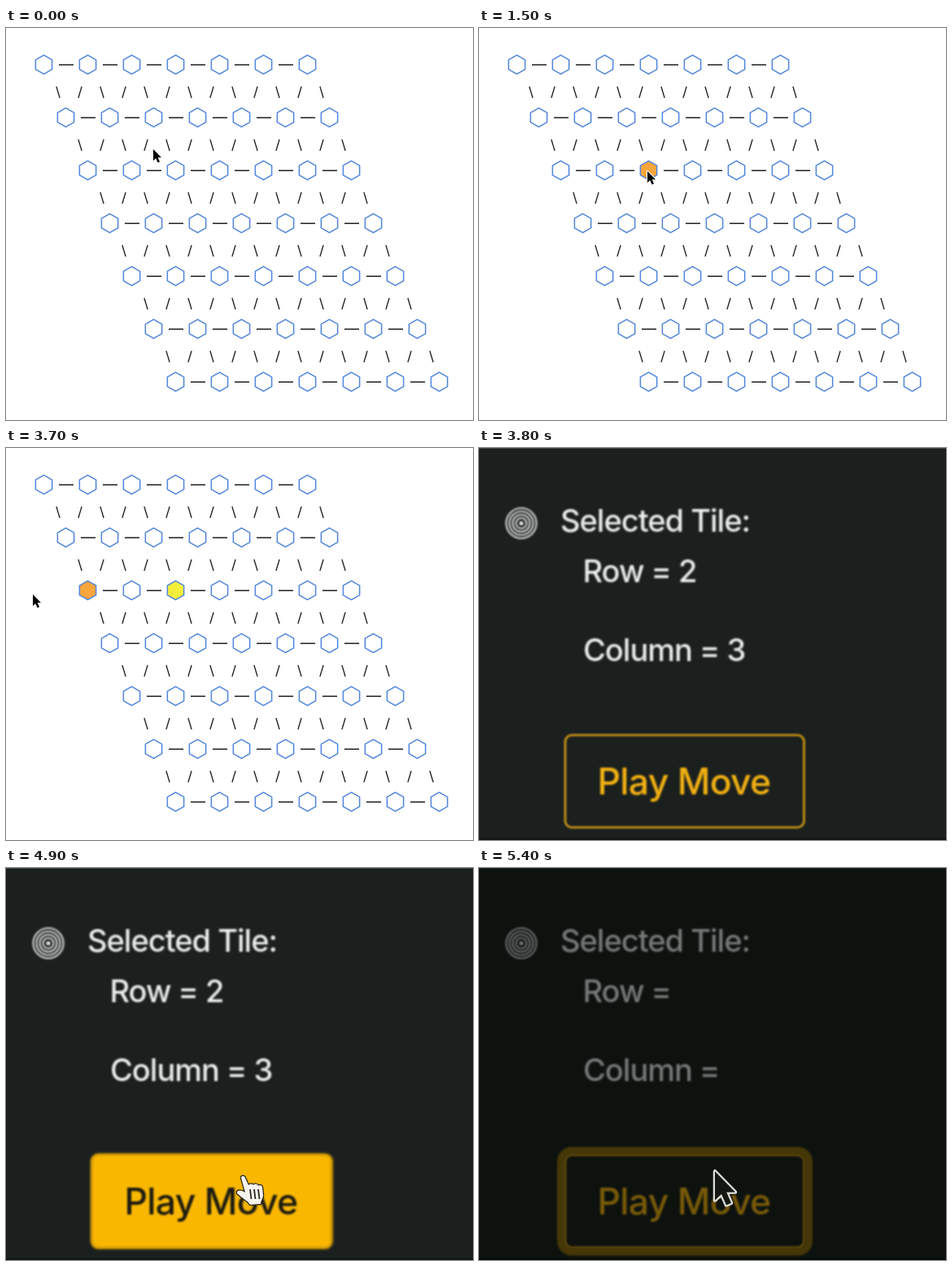
Animation, 574 px wide and 482 px high, one loop 5500 ms. Source, as an HTML page with a canvas:

```html
<!DOCTYPE html>
<html lang="en">
<head>
<meta charset="utf-8">
<title>Hex board move</title>
<style>
  html, body { margin: 0; width: 574px; height: 482px; overflow: hidden; background: #fff; }
  canvas { display: block; }
</style>
</head>
<body>
<canvas id="stage" width="574" height="482"></canvas>
<script>
const ctx = document.getElementById('stage').getContext('2d');
const W = 574, H = 482, LOOP = 5500, STEP = 100;
const SIZE = 7, HEX = 11.7;
const CUT = 3800, CLICK = 2300, PRESS = 4870, CLEAR = 5100, DIM = 5200;
const selected = { row: 2, col: 2 };

// Pointer keys: time, x, y
const boardPath = [[0, 181, 149], [100, 181, 149], [700, 207, 176], [3300, 207, 176],
  [3500, 160, 178], [3600, 102, 179], [3700, 33, 180]];
const panelPath = [[4000, 345, 325], [4100, 305, 362], [4200, 291, 378], [4600, 291, 378],
  [4900, 289, 379], [5100, 289, 379], [5200, 290, 373]];

const clamp = v => Math.max(0, Math.min(1, v));
const ramp = (t, start, length) => clamp((t - start) / length);

function along(path, t) {
  let i = 0;
  while (i < path.length - 2 && t > path[i + 1][0]) i++;
  const [t0, x0, y0] = path[i], [t1, x1, y1] = path[i + 1];
  const k = ramp(t, t0, t1 - t0);
  return [x0 + (x1 - x0) * k, y0 + (y1 - y0) * k];
}

const tileAt = (row, col) => [46.5 + 27 * row + 54 * col, 45 + 65 * row];

function line(x0, y0, x1, y1) {
  ctx.beginPath();
  ctx.moveTo(x0, y0);
  ctx.lineTo(x1, y1);
  ctx.stroke();
}

function hexagon(x, y, fill) {
  ctx.beginPath();
  for (let i = 0; i < 6; i++) {
    const a = Math.PI * (i / 3 - 0.5);
    ctx.lineTo(x + HEX * Math.cos(a), y + HEX * Math.sin(a));
  }
  ctx.closePath();
  if (fill) {
    ctx.fillStyle = fill;
    ctx.fill();
  }
  ctx.strokeStyle = '#4f84dc';
  ctx.lineWidth = 1.5;
  ctx.stroke();
}

function arrow(x, y, scale, fill, edge, width) {
  ctx.save();
  ctx.translate(x, y);
  ctx.scale(scale, scale);
  ctx.beginPath();
  for (const [px, py] of [[0, 0], [0, 14.2], [3.2, 11.2], [5.6, 16.6], [8, 15.6],
    [5.7, 10.3], [10, 10.2]]) ctx.lineTo(px, py);
  ctx.closePath();
  ctx.lineJoin = 'round';
  ctx.lineWidth = width;
  ctx.strokeStyle = edge;
  ctx.fillStyle = fill;
  ctx.stroke();
  ctx.fill();
  ctx.restore();
}

function hand(x, y) {
  ctx.save();
  ctx.translate(x, y);
  const shape = new Path2D('M0 2C0-1 4-1 5 2L9 11C11 9 14 9 15 11C17 9 20 9 21 12' +
    'C23 10 26 11 26 14L27 23C27 28 24 30 24 34L11 35C8 30 1 27-5 21C-6 17-1 16 5 20Z');
  ctx.filter = 'blur(0.7px)';
  ctx.lineJoin = 'round';
  ctx.lineWidth = 2.5;
  ctx.strokeStyle = '#25231c';
  ctx.stroke(shape);
  ctx.fillStyle = '#f6f4ee';
  ctx.fill(shape);
  ctx.lineWidth = 1.8;
  for (const dx of [0, 5, 10]) line(11 + dx, 16, 12.5 + dx, 28);
  ctx.restore();
}

function drawBoard(t) {
  ctx.fillStyle = '#fff';
  ctx.fillRect(0, 0, W, H);
  // The highlight trails the pointer by one step.
  const [hx, hy] = along(boardPath, t - STEP);
  for (let row = 0; row < SIZE; row++) {
    for (let col = 0; col < SIZE; col++) {
      const [x, y] = tileAt(row, col);
      ctx.strokeStyle = '#1c1c1c';
      ctx.lineWidth = 1.5;
      if (col < SIZE - 1) line(x + 18.5, y + 0.3, x + 36.5, y + 0.3);
      if (row < SIZE - 1) {
        ctx.lineWidth = 1.3;
        line(x + 15.4, y + 27, x + 19.6, y + 41);
        if (col > 0) line(x - 7.4, y + 27, x - 11.6, y + 41);
      }
      const picked = t >= CLICK && row === selected.row && col === selected.col;
      const hovered = Math.hypot(hx - x, hy - y) < HEX;
      hexagon(x, y, picked ? '#f5ef3c' : hovered ? '#fba63c' : null);
    }
  }
  arrow(...along(boardPath, t), 1, '#000', '#fff', 2);
}

function label(text, x, y, size, spacing, color) {
  ctx.font = `500 ${size}px Inter, sans-serif`;
  ctx.letterSpacing = `${spacing}px`;
  ctx.fillStyle = color;
  ctx.fillText(text, x, y);
}

function drawButton(t) {
  const hover = ramp(t, 4000, 150) * (1 - ramp(t, DIM, 150));
  const focus = ramp(t, PRESS, 150);
  if (focus) {
    const spread = 9 * focus;
    ctx.fillStyle = '#8c6a0e';
    ctx.beginPath();
    ctx.roundRect(105 - spread, 352 - spread, 296 + 2 * spread, 115.5 + 2 * spread, 9 + spread);
    ctx.roundRect(105, 352, 296, 115.5, 9);
    ctx.fill('evenodd');
  }
  ctx.beginPath();
  ctx.roundRect(106, 353, 293.5, 113.5, 8);
  ctx.fillStyle = `rgba(249, 183, 0, ${hover})`;
  ctx.fill();
  ctx.strokeStyle = hover > 0.5 ? '#f5b404' : '#d39a13';
  ctx.lineWidth = 2.6;
  ctx.stroke();
  const mix = (a, b) => Math.round(a + (b - a) * hover);
  label('Play Move', 145.5, 426, 44.5, -0.7, `rgb(${mix(242, 27)}, ${mix(177, 26)}, ${mix(18, 18)})`);
}

function drawPanel(t) {
  ctx.fillStyle = '#1b201f';
  ctx.fillRect(0, 0, W, H);
  ctx.fillStyle = '#414645';
  ctx.fillRect(0, 0, W, 1);
  ctx.fillStyle = '#101413';
  ctx.fillRect(0, 480, W, 2);

  ctx.filter = 'blur(1px)';
  ctx.strokeStyle = '#d6d9d8';
  ctx.lineWidth = 2.2;
  for (const r of [18.5, 14.5, 10.5, 6.5]) {
    ctx.beginPath();
    ctx.arc(52, 92.5, r, 0, Math.PI * 2);
    ctx.stroke();
  }
  ctx.beginPath();
  ctx.arc(52, 92.5, 2.6, 0, Math.PI * 2);
  ctx.fillStyle = '#eceeed';
  ctx.fill();

  const cleared = t >= CLEAR;
  const info = (text, x, y) => label(text, x, y, 38, -1, '#eceeed');
  info('Selected Tile:', 100, 102.5);
  info(cleared ? 'Row =' : 'Row = 2', 127.5, 165);
  info(cleared ? 'Column =' : 'Column = 3', 128, 261.5);
  drawButton(t);
  ctx.filter = 'none';

  ctx.fillStyle = `rgba(0, 4, 0, ${0.5 * ramp(t, DIM, 150)})`;
  ctx.fillRect(0, 0, W, H);

  if (t < 4000) return;
  const [x, y] = along(panelPath, t);
  const overButton = y > 352 && t < DIM;
  if (overButton) hand(x, y);
  else arrow(x, y, 2.5, '#151812', '#dededb', 1.8);
}

function frame(now) {
  const t = Math.floor((now % LOOP) / STEP) * STEP;
  if (t < CUT) drawBoard(t);
  else drawPanel(t);
  requestAnimationFrame(frame);
}
requestAnimationFrame(frame);
</script>
</body>
</html>
```
